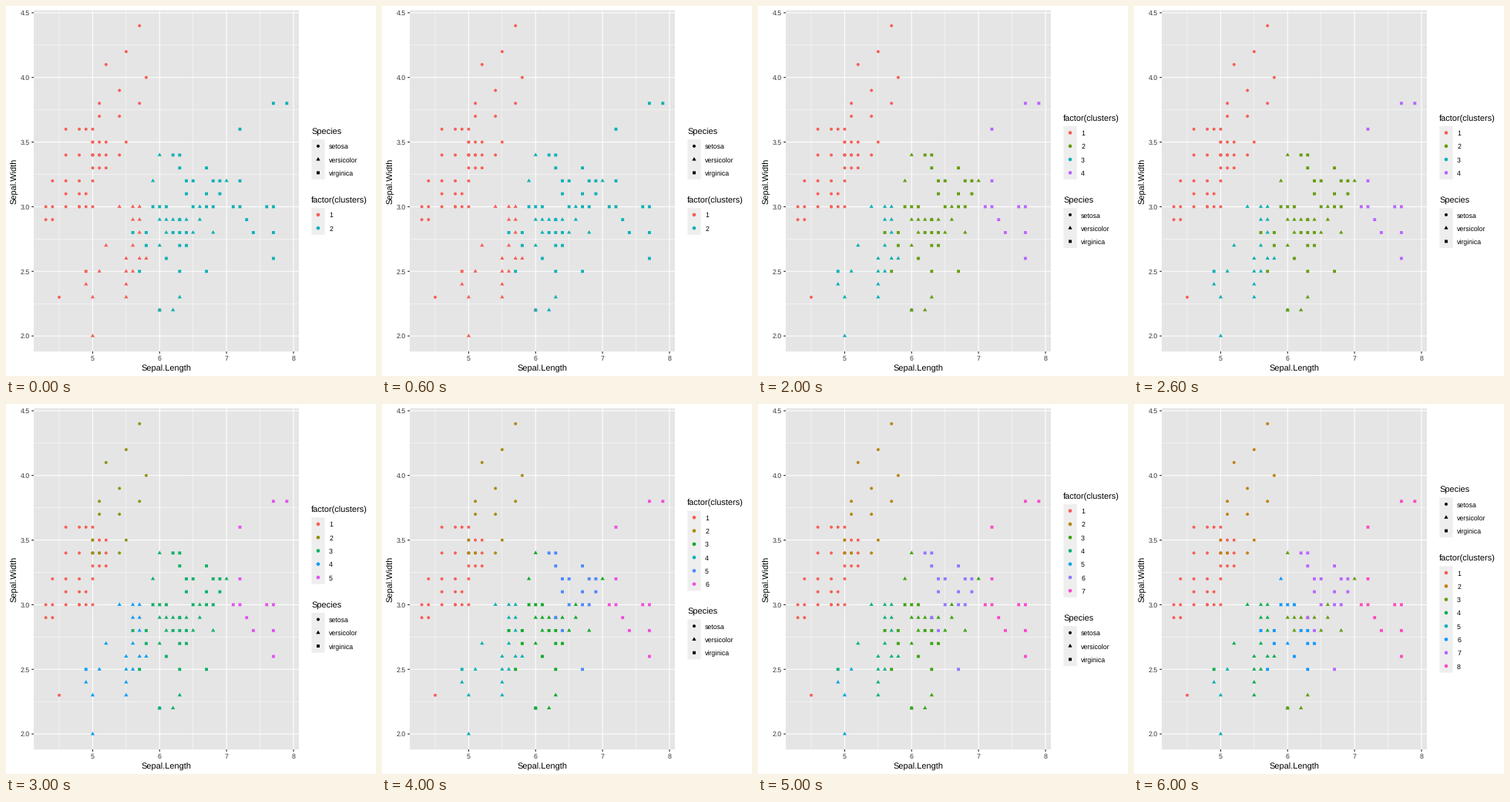
Write a matplotlib script that moves like this. It is 480 px wide and 480 px high and loops after 7 s.

```python
import numpy as np
import matplotlib.pyplot as plt
from matplotlib.animation import FuncAnimation
from matplotlib.collections import PolyCollection
from matplotlib.patches import Rectangle

plt.rcParams["font.family"] = "Liberation Sans"
plt.rcParams["text.hinting"] = "none"

SIZE, DPI = 480, 80
PT = 72 / DPI  # points per pixel
LEFT, RIGHT, TOP, BOTTOM = 36.0, 379.9, 5.5, 448.2
X_MIN, X_MAX, Y_MIN, Y_MAX = 4.12, 8.08, 1.88, 4.52
KEY, KEY_X, LEGEND_MID = 17.28, 396.3, 225.5
FINEST = 8

# Merges of the cluster tree from the finest cut upwards: (cluster, joins).
MERGES = [(6, 3), (5, 4), (7, 3), (2, 1), (8, 3), (4, 1)]


def grid(x0, x1, y0, y1, dx=1, dy=1):
    """Evenly spaced flowers, measured in tenths."""
    return [(x, y) for y in range(y0, y1 + 1, dy)
            for x in range(x0, x1 + 1, dx)]


def flowers():
    """Yield species, finest cluster and points: regular patches, then outliers."""
    yield "setosa", 1, (grid(46, 50, 30, 36, 2, 2) + grid(50, 52, 33, 35)
                        + grid(48, 49, 30, 31) + grid(43, 44, 29, 30)
                        + [(44, 32), (46, 31), (49, 36), (45, 23)])
    yield "setosa", 2, (grid(51, 54, 34, 37, 3, 3) + grid(50, 50, 34, 35)
                        + [(51, 38), (54, 39), (57, 38), (55, 35),
                           (58, 40), (52, 41), (55, 42), (57, 44)])
    yield "versicolor", 3, (grid(60, 64, 29, 29) + grid(61, 65, 28, 28, 4)
                            + grid(66, 66, 29, 30)
                            + [(60, 34), (70, 32), (68, 28), (63, 23), (62, 22)])
    yield "versicolor", 4, (grid(55, 55, 23, 26) + grid(56, 56, 25, 29, dy=2)
                            + grid(57, 57, 28, 30) + grid(54, 56, 30, 30, 2)
                            + grid(57, 58, 26, 26) + [(52, 27), (60, 22)])
    yield "versicolor", 5, [(51, 25), (49, 24), (50, 23), (50, 20)]
    yield "versicolor", 6, [(59, 32), (60, 27)]
    yield "virginica", 3, [(60, 22)]
    yield "virginica", 4, [(49, 25)]
    yield "virginica", 6, (grid(59, 61, 30, 30) + grid(62, 63, 28, 28)
                           + grid(63, 64, 27, 27) + grid(56, 58, 28, 28, 2)
                           + grid(57, 63, 25, 25, 6) + [(58, 27), (61, 26)])
    yield "virginica", 7, (grid(64, 69, 31, 32, 5) + grid(65, 68, 30, 32, 3, 2)
                           + grid(67, 67, 30, 31) + grid(62, 63, 34, 34)
                           + grid(63, 67, 33, 33, 4)
                           + [(63, 29), (64, 28), (67, 25)])
    yield "virginica", 8, (grid(77, 77, 26, 30, dy=2) + grid(77, 79, 38, 38, 2)
                           + [(72 + i, 30 - i) for i in range(-1, 3) if i >= 0]
                           + grid(72, 72, 32, 36, dy=4) + grid(71, 76, 30, 30, 5))


def cut(k):
    """Label of each finest cluster when the tree is cut into k groups."""
    roots = list(range(1, FINEST + 1))
    for old, new in MERGES[:FINEST - k]:
        roots = [new if r == old else r for r in roots]
    order = sorted(set(roots))
    return [order.index(r) for r in roots]


def palette(n):
    """Equally spaced hues of constant chroma and lightness, slightly darkened."""
    hue = np.radians(15 + 360 * np.arange(n) / n)
    light, chroma = 65, 100
    u = chroma * np.cos(hue) / (13 * light) + 0.1978
    v = chroma * np.sin(hue) / (13 * light) + 0.4683
    y = ((light + 16) / 116) ** 3
    xyz = np.array([9 * u, 4 * v, 12 - 3 * u - 20 * v]) * y / (4 * v)
    to_rgb = np.array([[3.2405, -1.5371, -0.4985],
                       [-0.9693, 1.8760, 0.0416],
                       [0.0556, -0.2040, 1.0572]])
    rgb = np.clip(to_rgb @ xyz, 0, 1).T
    rgb = np.where(rgb > 0.0031308, 1.055 * rgb ** (1 / 2.4) - 0.055, 12.92 * rgb)
    return np.clip(rgb ** 1.27, 0.06, 1)


def circle(radius):
    turn = np.linspace(0, 2 * np.pi, 32, endpoint=False)
    return radius * np.column_stack([np.cos(turn), np.sin(turn)])


SHAPES = {
    "setosa": circle(1.98),
    "versicolor": np.array([(0, -3.03), (2.63, 1.52), (-2.63, 1.52)]),
    "virginica": 1.95 * np.array([(-1, -1), (1, -1), (1, 1), (-1, 1)]),
}
DOT = circle(2.3)


def px(x):
    return LEFT + (x - X_MIN) / (X_MAX - X_MIN) * (RIGHT - LEFT)


def py(y):
    return BOTTOM - (y - Y_MIN) / (Y_MAX - Y_MIN) * (BOTTOM - TOP)


fig = plt.figure(figsize=(SIZE / DPI, SIZE / DPI), dpi=DPI, facecolor="white")
ax = fig.add_axes([0, 0, 1, 1])
ax.set_xlim(0, SIZE)
ax.set_ylim(SIZE, 0)
ax.axis("off")


def box(x, y, w, h, color):
    return ax.add_patch(Rectangle((x, y), w, h, fc=color, lw=0, snap=False))


def line(xs, ys, width, color):
    ax.plot(xs, ys, color=color, lw=width * PT, solid_capstyle="butt",
            snap=False, zorder=1.5)


def label(x, y, text, size, color="black", **kw):
    return ax.text(x, y, text, fontsize=size * PT, color=color,
                   va="baseline", **kw)


def markers(shape, centers, color):
    polys = PolyCollection([shape + c for c in np.array(centers)],
                           facecolors=[color], linewidths=0, zorder=3)
    polys.set_snap(False)
    return ax.add_collection(polys)


def draw_panel():
    grey, dark = "#383838", "#222222"
    box(LEFT, TOP, RIGHT - LEFT, BOTTOM - TOP, "#E5E5E5")
    for x in np.arange(4.5, 8, 1):
        line([px(x)] * 2, [TOP, BOTTOM], 0.53, "white")
    for y in np.arange(2.25, 4.5, 0.5):
        line([LEFT, RIGHT], [py(y)] * 2, 0.53, "white")
    for x in range(5, 9):
        line([px(x)] * 2, [TOP, BOTTOM], 1.07, "white")
        line([px(x)] * 2, [BOTTOM, BOTTOM + 2.75], 1.07, dark)
        label(px(x), 460.4, str(x), 8.8, grey, ha="center")
    for y in np.arange(2, 4.6, 0.5):
        line([LEFT, RIGHT], [py(y)] * 2, 1.07, "white")
        line([LEFT - 2.75, LEFT], [py(y)] * 2, 1.07, dark)
        label(LEFT - 5, py(y) + 3.2, f"{y:.1f}", 8.8, grey, ha="right")
    label((LEFT + RIGHT) / 2, 473.4, "Sepal.Length", 11, ha="center")
    label(14.2, (TOP + BOTTOM) / 2, "Sepal.Width", 11, ha="center",
          rotation=90, rotation_mode="anchor")


def draw_legend(k, colors):
    species = ("Species", [(name, shape, "black")
                           for name, shape in SHAPES.items()])
    clusters = ("factor(clusters)",
                [(str(i + 1), DOT, color) for i, color in enumerate(colors)])
    blocks = [species, clusters] if k in (2, FINEST) else [clusters, species]

    to_key, to_title = 18.9, 35.6
    y = LEGEND_MID - (2 * to_key + to_title + (k + 1) * KEY) / 2
    parts = []
    for title, rows in blocks:
        parts.append(label(KEY_X, y + 3.8, title, 11))
        y += to_key
        parts.append(box(KEY_X, y - KEY / 2, KEY, KEY * len(rows), "#EEEEEE"))
        for text, shape, color in rows:
            parts.append(markers(shape, [(KEY_X + KEY / 2, y)], color))
            parts.append(label(KEY_X + KEY + 5.5, y + 3.6, text, 8.8))
            y += KEY
        y += to_title - KEY
    return parts


draw_panel()
groups = []
for name, cluster, spots in flowers():
    centers = [(px(x / 10), py(y / 10)) for x, y in spots]
    groups.append((cluster, markers(SHAPES[name], centers, "black")))
legend = []


def update(frame):
    k = frame + 2
    labels, colors = cut(k), palette(k)
    for cluster, polys in groups:
        polys.set_facecolor(colors[labels[cluster - 1]])
    for part in legend:
        part.remove()
    legend[:] = draw_legend(k, colors)
    return []


anim = FuncAnimation(fig, update, frames=FINEST - 1, interval=1000,
                     init_func=lambda: update(0), repeat=True, repeat_delay=0)
plt.show()
```
